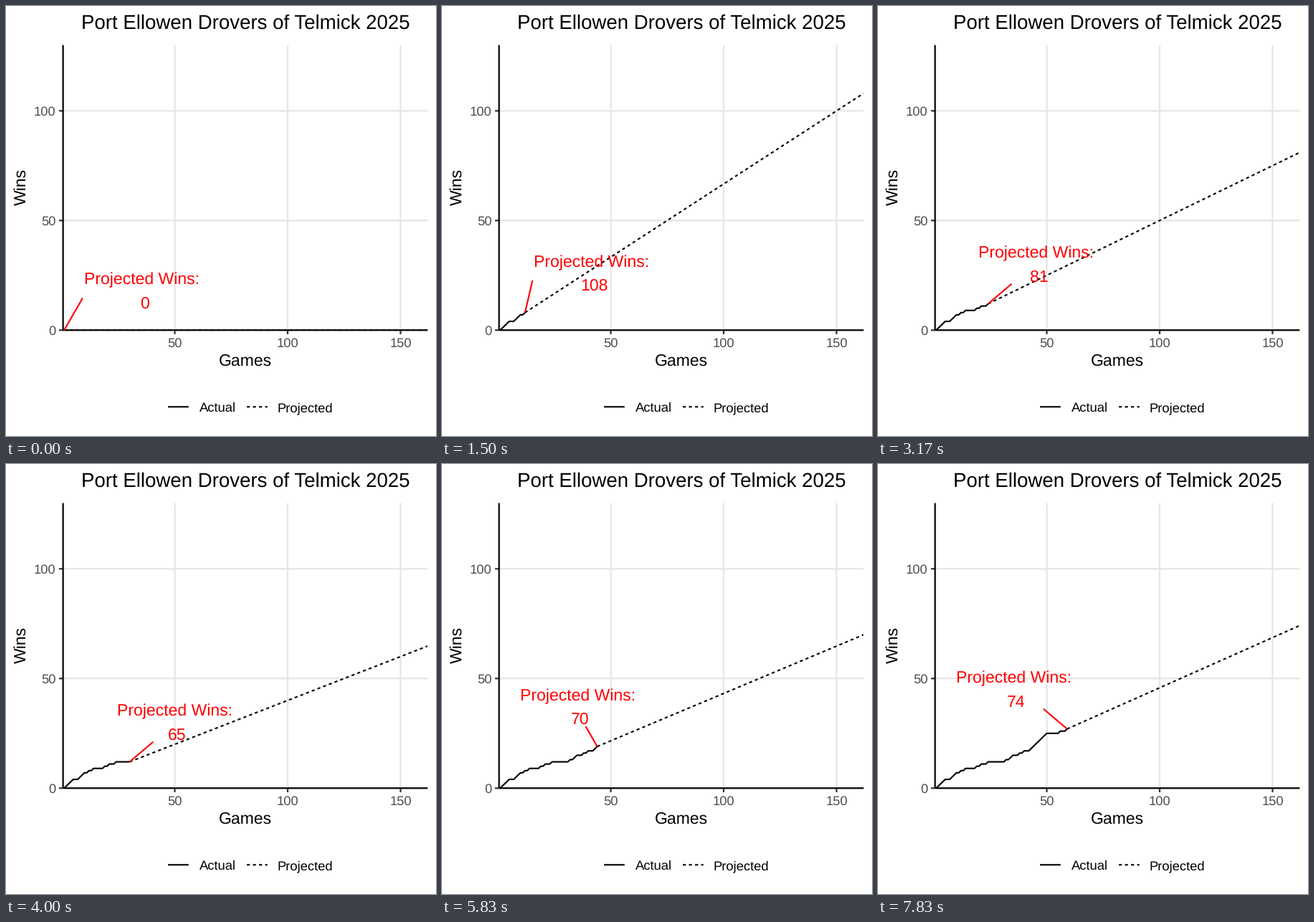
Recreate the animation shown at these times as a matplotlib script. Size 600 px wide and 600 px high, loop 8000 ms.

```python
import numpy as np
import matplotlib as mpl
import matplotlib.pyplot as plt
from matplotlib.animation import FuncAnimation
from matplotlib.patches import Rectangle

mpl.rcParams["font.family"] = "Liberation Sans"
mpl.rcParams["text.hinting"] = "none"
mpl.rcParams["path.snap"] = False
mpl.rcParams["toolbar"] = "None"

SIZE, DPI = 600, 72          # at 72 dpi one point is one pixel
POSES, HOLD, LOOP = 48, 5, 8000
FRAMES = POSES * HOLD
SEASON = 162
STEP = (SEASON - 1) / 131    # games per pose
BASE = 23
LEFT, RIGHT, TOP, BOTTOM = 79.6, 588.4, 54.5, 452.3
AXIS_W, LINE_W = 2.23, 2.13
DASH = (0, (2, 2))

WON = {2, 3, 4, 5, 8, 9, 10, 12, 14, 19, 21, 24, 32, 34, 35, 38, 40,
       *range(43, 51), 56, 59}
games = np.arange(1, 60)
wins = np.cumsum([g in WON for g in games])


def sx(game):
    return 78.0 + 3.15 * game


def sy(win):
    return BOTTOM - 3.06 * win


fig = plt.figure(figsize=(SIZE / DPI, SIZE / DPI), dpi=DPI, facecolor="white")
ax = fig.add_axes([0, 0, 1, 1])
ax.set_xlim(0, SIZE)
ax.set_ylim(SIZE, 0)
ax.axis("off")


def line(xs, ys, color="black", width=LINE_W, style="-", z=3):
    item, = ax.plot(xs, ys, color=color, lw=width, ls=style, zorder=z,
                    solid_capstyle="butt", dash_capstyle="butt",
                    solid_joinstyle="round")
    return item


def text(x, y, s, size=BASE, color="black", ha="center", **kw):
    return ax.text(x, y, s, fontsize=size, color=color, ha=ha,
                   va="baseline", zorder=6, **kw)


def draw_chart():
    small = 0.8 * BASE
    for g in (50, 100, 150):
        line([sx(g)] * 2, [TOP, BOTTOM], "#e5e5e5", AXIS_W, z=1)
        line([sx(g)] * 2, [BOTTOM, BOTTOM + 5.7], "#333333", AXIS_W, z=4)
        text(sx(g), 476, str(g), small, "#4d4d4d")
    for w in (0, 50, 100):
        if w:
            line([LEFT, RIGHT], [sy(w)] * 2, "#e5e5e5", AXIS_W, z=1)
        line([LEFT - 5.7, LEFT], [sy(w)] * 2, "#333333", AXIS_W, z=4)
        text(69.4, sy(w) + 6.5, str(w), small, "#4d4d4d", "right")
    line([LEFT, RIGHT], [BOTTOM] * 2, width=AXIS_W, z=5)
    line([LEFT, LEFT], [TOP, BOTTOM], width=AXIS_W, z=5)

    text(334, 32, "Port Ellowen Drovers of Telmick 2025", 1.2 * BASE)
    text(334, 502, "Games")
    text(28, 278.5, "Wins", ha="left", rotation=90, rotation_mode="anchor")

    line([226, 254.8], [559.3] * 2)
    text(269.5, 566, "Actual", small, ha="left")
    line([336, 364.8], [559.3] * 2, style=DASH)
    text(378.5, 566, "Projected", small, ha="left")


draw_chart()
panel = Rectangle((LEFT, TOP), RIGHT - LEFT, BOTTOM - TOP,
                  transform=ax.transData)
actual = line([], [])
projected = line([], [], style=DASH)
pointer = line([], [], "red", z=5.5)
for item in (actual, projected):
    item.set_clip_path(panel)
caption = text(0, 0, "Projected Wins:", color="red", ha="left")
count = text(0, 0, "", color="red")


def label_left(k):
    """Left edge of the caption; it flips back to the left late on."""
    if k >= 29:
        return 108.6
    return np.interp(k, [0, 5, 13, 19, 21, 28],
                     [109, 122, 134.5, 140.5, 152, 158])


def pointer_end(px, py, left):
    """Where the pointer meets the caption's box."""
    bottom = py - 28
    if px < left - 2:
        return left - 2, bottom - 16.8
    return px + np.clip(0.62 * (left + 82 - px), -33, 33), bottom


def update(i):
    # each pose starts one short frame early, ahead of rounded clock times
    k = min((i + 1) // HOLD, POSES - 1)
    game = 1 + round(STEP * k)
    won = wins[game - 1]
    total = won / game * SEASON
    px, py = sx(game), sy(won)
    left = label_left(k)
    ex, ey = pointer_end(px, py, left)

    actual.set_data(sx(games[:game]), sy(wins[:game]))
    projected.set_data([px, sx(SEASON)], [py, sy(total)])
    pointer.set_data([px, ex], [py, ey])
    caption.set_position((left, py - 64))
    count.set_position((left + 84.5, py - 31))
    count.set_text(str(round(total)))
    return actual, projected, pointer, caption, count


anim = FuncAnimation(fig, update, frames=FRAMES, interval=LOOP / FRAMES,
                     init_func=lambda: update(0), repeat=True,
                     repeat_delay=0, blit=False)
plt.show()
```
